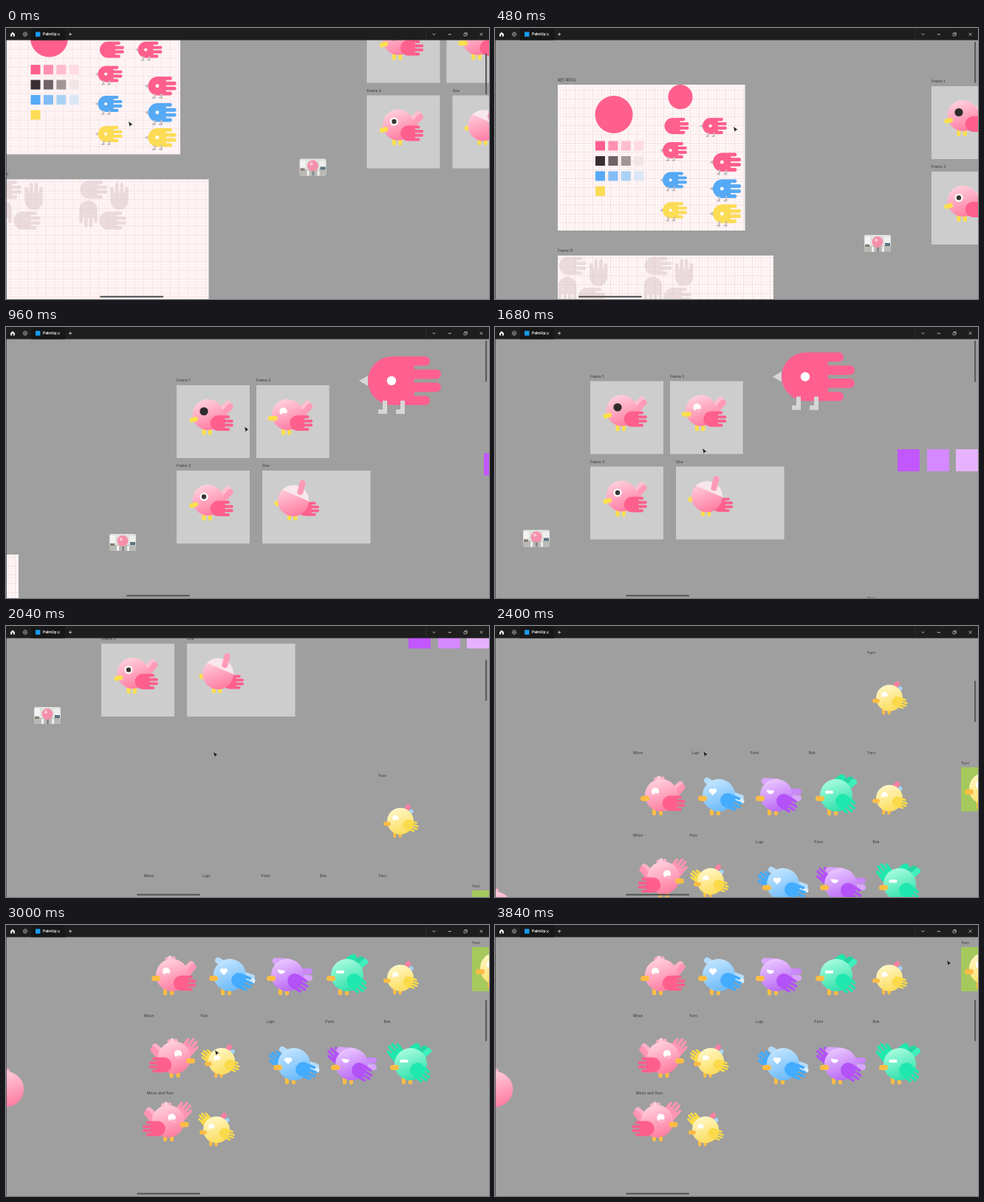
An HTML page that plays this animation: 654x368 px, repeating every 3.96 s.

```html
<!DOCTYPE html>
<html lang="en">
<head>
<meta charset="utf-8">
<title>Design board</title>
<style>
html, body { margin: 0; width: 100%; height: 100%; overflow: hidden; background: #9f9f9f; }
svg { display: block; width: 654px; height: 368px; }
text { font: 5px Inter, "Noto Sans CJK KR", "Noto Sans CJK", sans-serif; fill: #333; }
.title { font-weight: 600; fill: #fff; }
</style>
</head>
<body>
<svg viewBox="0 0 654 368">
  <defs id="defs">
    <pattern id="grid" width="12" height="12" patternUnits="userSpaceOnUse">
      <path d="M0 4.5H12M0 8.5H12M4.5 0V12M8.5 0V12" stroke="#f3c6cd" stroke-width=".5" stroke-dasharray="1 1" opacity=".65"/>
      <path d="M0 .5H12M.5 0V12" stroke="#efaeb9" stroke-width=".6" stroke-dasharray="2 1" opacity=".75"/>
    </pattern>
  </defs>
  <rect width="654" height="368" fill="#9f9f9f"/>
  <g id="world"></g>
  <rect y="16" width=".8" height="352" fill="#444"/>
  <rect id="hbar" y="363.8" width="86" height="2.2" rx="1.1" fill="#5b5b5b"/>
  <rect id="vbar" x="649" width="2.2" height="56" rx="1.1" fill="#5b5b5b"/>
  <g id="chrome" fill="none" stroke="#ddd" stroke-width=".8">
    <rect width="654" height="16.5" fill="#1e1e1e" stroke="none"/>
    <rect x="34" width="46" height="16.5" fill="#171717" stroke="none"/>
    <path d="M569 0V16.5" stroke="#303030"/>
    <path d="M6 8.2L9 5.5L12 8.2V11.4H9.8V9H8.2V11.4H6Z" fill="#e8e8e8" stroke="none"/>
    <g stroke="#aaa" stroke-width=".6"><circle cx="26" cy="8.5" r="2.8"/><ellipse cx="26" cy="8.5" rx="1.2" ry="2.8"/><path d="M23.2 8.5H28.8"/></g>
    <rect x="40" y="5.3" width="6.4" height="6.4" fill="#189bf2" stroke="none"/>
    <text class="title" x="50" y="10.3" stroke="none">PalmUp</text>
    <path d="M69.6 7L73 10.4M73 7L69.6 10.4M85 8.5H89.2M87.1 6.4V10.6"/>
    <path d="M577.6 7.6L579.5 9.4L581.4 7.6M598.8 8.7H603"/>
    <path d="M620 7.6H623.2V10.8H620ZM621.2 7.4V6.4H624.4V9.6H623.4" stroke-width=".6"/>
    <path d="M641.8 6.7L645.4 10.3M645.4 6.7L641.8 10.3"/>
  </g>
  <path id="cursor" d="M0 0L5.6 4.3L2.9 4.8L1.7 7.2Z" fill="#111" stroke="#bbb" stroke-width=".3"/>
</svg>
<script>
const $ = id => document.getElementById(id);

// light, low, deep, pale
const pal = {
  pink:   ['#ffcddb', '#ff7ba1', '#ff5f8d', '#ffb0c6'],
  blue:   ['#bfe3ff', '#69b9fa', '#43acff', '#b5dcfb'],
  purple: ['#e8c4ff', '#b866f5', '#b352f7', '#d8a5fb'],
  green:  ['#a4fbdc', '#2be0ab', '#1fe8ae', '#3df0bb'],
  yellow: ['#fff6c4', '#fcdc58', '#fada4a', '#fdeb9a']
};
const orange = '#fdbd45', sun = '#fbe04e', grey = '#d6d6d6';

const rect = (x, y, w, h, fill, rx = 0) =>
  `<rect x="${x}" y="${y}" width="${w}" height="${h}" rx="${rx}" fill="${fill}"/>`;
const disc = (x, y, r, fill) => `<circle cx="${x}" cy="${y}" r="${r}" fill="${fill}"/>`;
const bar = (x1, y1, x2, y2, w, c) =>
  `<path d="M${x1} ${y1}L${x2} ${y2}" stroke="${c}" stroke-width="${w}" stroke-linecap="round"/>`;
const label = (x, y, s) => `<text x="${x}" y="${y}">${s}</text>`;
const at = (x, y, k, s) => `<g transform="translate(${x} ${y}) scale(${k})">${s}</g>`;

// Round palm with four fingers, 99 x 66
const tip = 'a6.3 6.3 0 0 1 0 12.6', gap = 'H65a2.6 2.6 0 0 0 0 5.2';
const handPath = `M33 0H77.7${tip}${gap}H92.7${tip}${gap}H92.7${tip}${gap}H77.7${tip}H33A33 33 0 0 1 33 0Z`;
const hand = (x, y, s, fill, rot = 0) =>
  `<path d="${handPath}" fill="${fill}" transform="translate(${x} ${y}) rotate(${rot}) scale(${s}) translate(-33 -33)"/>`;

// Flat hand-shaped bird
const flatBird = (x, y, k, fill, limb = grey) => at(x, y, k,
  `<path d="M-12 33L0 26V40Z" fill="${limb}"/>` + hand(33, 33, 1, fill) + disc(32, 33, 6.2, '#fff') +
  [14, 38].map(a => rect(a + 6, 60, 6, 18, limb) + rect(a, 72, 12, 6, limb)).join(''));

const eyes = {
  lid: c => disc(0, 0, 5.2, '#fff') + `<ellipse cx="1.5" cy="4.6" rx="4" ry="2.4" fill="${c}"/>`,
  heart: () => '<path d="M0 5L-4.6 .5A2.8 2.8 0 0 1 0 -3A2.8 2.8 0 0 1 4.6 .5Z" fill="#fff"/>',
  half: () => '<path d="M-5 -2.4L5 -1A5 5 0 0 1 -5 -2.4Z" fill="#fff"/>',
  shut: () => rect(-5.5, -1.2, 11, 4, '#fff', 1.6),
  dark: () => disc(0, 0, 5.6, '#2f2b2d'),
  ring: () => disc(0, 0, 5.6, '#fff') + disc(0, 0, 3.2, '#3a3336'),
  none: () => ''
};

const tails = {
  pink: (c, d) => bar(-d * 17, -7, -d * 26, -15, 8, c[3]) + bar(-d * 22, -3, -d * 28.5, -11, 8, '#ff94b3'),
  blue: c => bar(18, -1, 30, 3, 8, c[3]) + bar(18, 5, 31, 8, 7, '#d6ecfd'),
  purple: c => bar(18, -5, 30, -5, 8, '#c987f8') + bar(18, 3, 30, 4, 8, c[3]),
  green: c => bar(12, -17, 19, -21, 9, '#25d6a4') + bar(17, -12, 24, -18, 8, c[3]),
  yellow: () => bar(8, -17, 13, -24, 8, '#ff7fa2') + bar(13, -11, 18, -16, 7, '#a5d3f6')
};
const tufts = {
  pink: c => bar(-7, -22, -5, -19, 5, c[3]) + bar(-3, -24, -3, -19, 5, c[0]) + bar(2, -23, 0, -19, 5, c[3]),
  blue: c => bar(-16, -20, -8, -15, 8, c[3]),
  purple: c => bar(-16, -19, 1, -18, 9, c[3]),
  green: c => bar(2, -20, 8, -24, 9, c[2]),
  yellow: () => ''
};

const baseWing = {
  pink: [12, 11, .31, 0], blue: [12, 7, .3, 22], purple: [10, 8, .3, 32],
  green: [9, 8, .3, 40], yellow: [13, 6, .26, 18]
};
const baseEye = { pink: 'lid', blue: 'heart', purple: 'half', green: 'shut', yellow: 'lid' };

function bird(x, y, kind, o = {}) {
  const c = pal[kind], d = o.dir || -1, k = kind == 'yellow' && !o.big ? .82 : 1;
  const leg = d < 0 ? -5 : .5, wing = o.wing || baseWing[kind];
  const [ex, ey] = o.eye || [d < 0 ? -8 : 5, -5];
  return at(x, y, k,
    (o.raise ? hand(...o.raise.slice(0, 3), kind == 'pink' ? '#ff95b3' : c[2], o.raise[3]) : '') +
    tails[kind](c, d) + tufts[kind](c) +
    bar(leg - 4.5, 20, leg - 4.5, 25, 5, orange) + bar(leg + 4.5, 20, leg + 4.5, 25, 5, orange) +
    disc(0, 0, 22, `url(#${kind})`) +
    bar(d * 24.5, 4.5, d * 19.5, 4.5, 7, orange) +
    at(ex, ey, 1, eyes[baseEye[kind]](c[3])) +
    hand(wing[0], wing[1], wing[2], c[2], wing[3]));
}

function frameBird(x, y, eye, flatBeak) {
  const c = pal.pink;
  return at(x, y, 1,
    bar(19, -7, 27, -15, 8, '#ffc0d0') + bar(22, -2, 30, -11, 8, '#ff9ab7') +
    bar(-5.5, 20, -5.5, 25.5, 5, sun) + bar(2.8, 20, 2.8, 25.5, 5, sun) +
    disc(0, 0, 21, 'url(#pink)') +
    (flatBeak ? bar(-23, 5, -16.5, 5, 6.4, sun) : bar(-22, 7.6, -16.5, 6, 6.2, sun)) +
    at(-5.5, -4.5, 1, eyes[eye](c[3])) + hand(13.5, 11.5, .315, c[2]));
}

function cappedBird(x, y) {
  return at(x, y, 1,
    bar(-22, 3.5, -19, 3.5, 7, sun) + bar(-5.5, 20, -5.5, 24, 5, sun) + bar(2.8, 20, 2.8, 24, 5, sun) +
    hand(16, 11, .29, pal.pink[2]) + disc(0, 0, 21, 'url(#pink)') +
    '<path d="M-15 -15A21 21 0 0 1 21 -1L22 1Z" fill="#f8e7ec"/>' +
    bar(9.5, -12, 12.5, -24, 8, '#ff9ab7'));
}

function leftPages() {
  const rows = [
    ['#ff5f8d', '#ff90b0', '#ffbdd0', '#ffdbe5'],
    ['#382e33', '#6f6266', '#a19799', '#f0e6e8'],
    ['#55a9f5', '#82bdf7', '#aad2f5', '#dae8f5'],
    ['#fcdc55']
  ];
  const page = (x, y, w, h) => rect(x, y, w, h, '#fef7f7');
  const [p, b, w] = ['#ff5f8d', '#55a9f5', '#fcdc55'];
  let s = label(85, 72, '메인 페이지') + page(85, 77, 253.5, 198) + rect(85, 77, 253.5, 198, 'url(#grid)');
  s += disc(161, 117.5, 25.5, p) + disc(251, 93.7, 16.6, p);
  rows.forEach((r, j) => r.forEach((c, i) => s += rect(136 + i * 17.4, 153.5 + j * 20.5, 13, 13, c)));
  s += hand(240.5, 133, .333, p) + flatBird(281, 122, .333, p, '#c6bdc0');
  [[155, 169.5, p], [195.5, 205.5, b], [236.5, 239.5, w]].forEach(([y1, y2, c]) =>
    s += flatBird(227, y1, .333, c, '#c6bdc0') + flatBird(295, y2, .385, c, '#c6bdc0'));

  s += label(85, 304, 'Frame 11') + page(85, 309, 292, 220);
  [87, 203].forEach(x => {
    const tone = '#e9dddf';
    s += hand(x + 12, 323, .37, tone) + hand(x + 53, 338, .37, tone, -90) +
         hand(x + 11, 350, .37, tone, 90) + hand(x + 38, 365, .37, tone);
  });
  return s + rect(85, 309, 292, 220, 'url(#grid)');
}

function frames() {
  const card = (x, y, w, name) => label(x, y - 4.6, name) + rect(x, y, w, 99, '#cdcdcd');
  const photo = at(140, 281, 1,
    rect(0, 0, 36, 23, '#dfe2df', 2) + rect(1, 2, 7, 10, '#f3f4f2') + rect(27, 3, 8, 8, '#eef0ee') +
    rect(0, 15, 36, 8, '#b9bab5', 2) + rect(28, 11, 7, 4, '#5c7280') + rect(1, 13, 6, 3, '#85796c') +
    disc(18, 9.5, 7.5, '#f590ab') + disc(16, 7, 2.2, '#fac3d0') +
    rect(10, 16, 3, 7, '#f1f1ef') + rect(17, 17, 3, 6, '#838b92') + rect(24, 16, 3, 7, '#efefed'));
  return card(231, 79, 99, 'Frame 1') + card(339, 79, 98.7, 'Frame 2') +
    card(231, 195, 99, 'Frame 3') + card(347, 195, 146.6, 'One') +
    frameBird(273.5, 119, 'dark') + frameBird(381, 119, 'lid', true) +
    frameBird(273.5, 235, 'ring') + cappedBird(389, 236) + photo +
    flatBird(490, 40, 1, '#ff6090') +
    rect(647, 171.5, 30, 30, '#c257ff') + rect(687, 171.5, 30, 30, '#d588ff') + rect(726, 171.5, 30, 30, '#e6b2ff');
}

function cast() {
  const five = 'Mirun', four = 'Lupi', three = 'Pomi', two = 'Bok', one = 'Yuro';
  const right = { dir: 1, raise: [16, -9, .3, -50], wing: [-14, 10, .31, 180] };
  let s = [five, four, three, two, one].map((n, i) => label(187 + i * 79.3, 83.2, n)).join('');
  s += label(504, -53.3, one) + bird(534, 7, 'yellow');
  s += bird(225, 139, 'pink') + bird(303, 139, 'blue') + bird(381, 139, 'purple') +
       bird(462, 139, 'green', { eye: [-9.5, -5] }) + bird(534, 143, 'yellow');
  s += label(631, 97, one) + rect(631, 101, 60, 60, '#a5c95c') + bird(664, 130, 'yellow', { big: true });

  s += label(187, 195.6, five) + label(263, 195.6, one) +
       [four, three, two].map((n, i) => label(353 + i * 79.3, 203.8, n)).join('');
  s += bird(228, 251, 'pink', right) +
       bird(292, 256, 'yellow', { raise: [-18, -5, .27, 218] }) +
       bird(390, 260, 'blue', { raise: [-18, -3, .28, 218] }) +
       bird(468, 260, 'purple', { raise: [-17, -8, .28, 222] }) +
       bird(548, 260, 'green', { raise: [-16, -11, .3, 233], eye: [-9, -5] });

  s += label(191, 300.8, `${five} and ${one}`);
  s += bird(219.5, 337.5, 'pink', right) + bird(285, 349, 'yellow', { raise: [-15, -13, .27, 230] });
  return s + at(0, 294, 1.1, tufts.pink(pal.pink) + disc(0, 0, 22, 'url(#pink)'));
}

$('defs').innerHTML += Object.entries(pal).map(([id, c]) =>
  `<linearGradient id="${id}" x1=".3" y1="0" x2=".65" y2="1"><stop offset=".05" stop-color="${c[0]}"/><stop offset="1" stop-color="${c[1]}"/></linearGradient>`).join('');
$('world').innerHTML = at(-360, 0, 1, leftPages()) + frames() + at(102, 429, 1, cast());

// time, board x, board y, pointer x, pointer y
const keys = [
  [0, 257.5, -103.5, 166, 127],
  [480, 360, 0, 323, 134],
  [960, 0, 0, 323, 135.5],
  [1200, -102, -5.5, 300, 152],
  [1680, -102, -5.5, 281, 165],
  [1800, -102, -5.5, 281, 167],
  [2040, -102, -171, 281, 171],
  [2640, -102, -429, 283, 170],
  [3000, -102, -500, 283, 170],
  [3720, -102, -500, 612, 48],
  [3960, -102, -500, 612, 48]
];
const LOOP = 3960, STEP = 120;

function pose(t) {
  const i = keys.findIndex(k => k[0] > t), a = keys[i - 1], b = keys[i];
  const u = (t - a[0]) / (b[0] - a[0]), e = u * u * (3 - 2 * u);
  return a.map((v, n) => v + (b[n] - v) * e);
}

function draw(ms) {
  const t = Math.floor((ms % LOOP) / STEP) * STEP;
  const [, x, y, px, py] = pose(t);
  $('world').setAttribute('transform', `translate(${x} ${y})`);
  $('cursor').setAttribute('transform', `translate(${px} ${py})`);
  $('hbar').setAttribute('x', 163 - x * .139);
  $('vbar').setAttribute('y', 18.5 + .17 * Math.max(0, -y - 10));
}

const start = performance.now();
function tick() {
  draw(performance.now() - start);
  requestAnimationFrame(tick);
}
tick();
</script>
</body>
</html>
```
